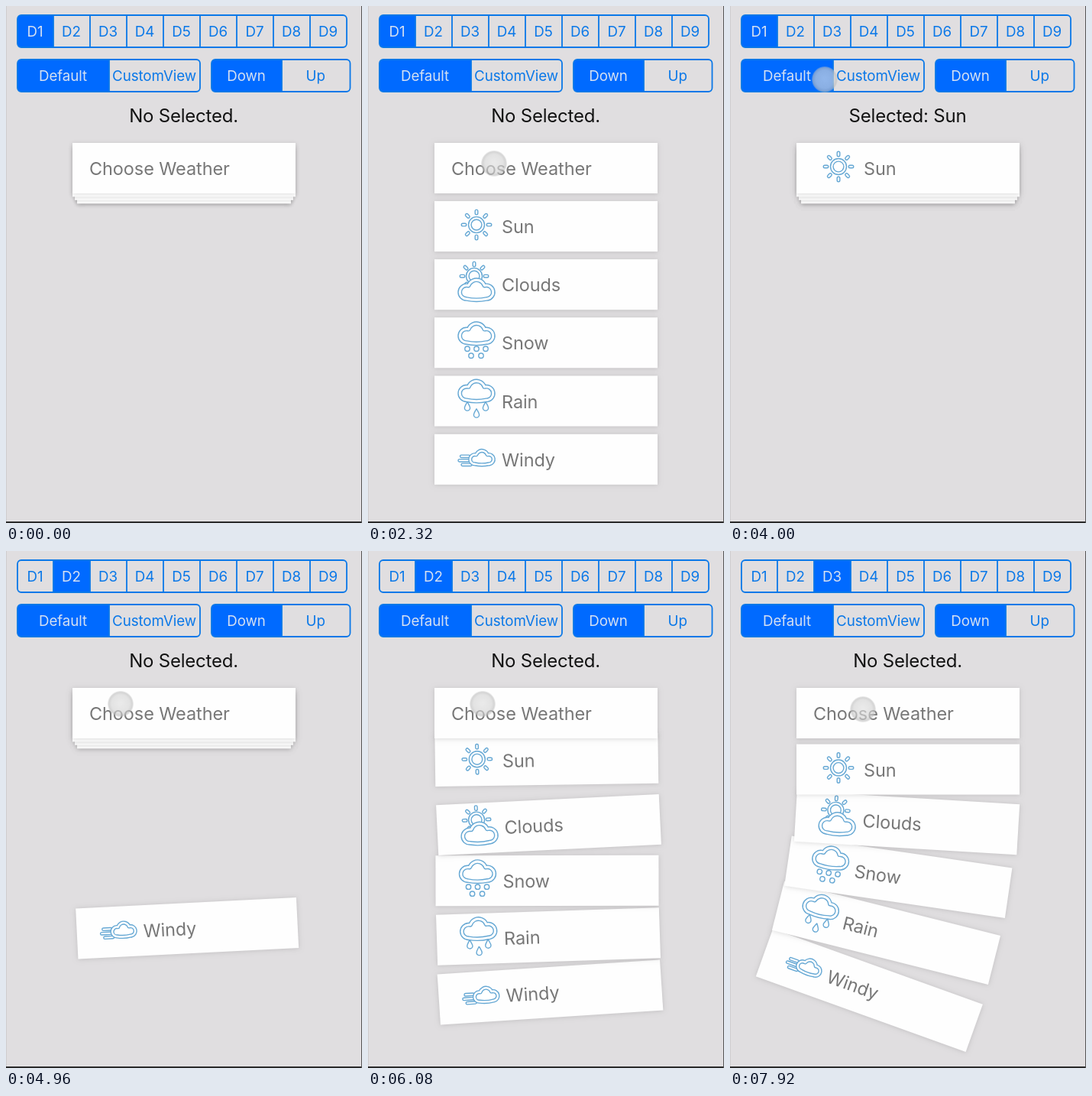
An HTML page with a canvas that plays this animation: 466x676 px, repeating every 8 s.

```html
<!DOCTYPE html>
<html lang="en">
<head>
<meta charset="utf-8">
<title>Drop-down menu</title>
<style>
html, body { margin: 0; width: 466px; height: 676px; overflow: hidden; background: #e0dee0; }
canvas { display: block; }
</style>
</head>
<body>
<canvas id="stage" width="466" height="676"></canvas>
<script>
const c = document.getElementById('stage').getContext('2d');
const LOOP = 8000, STEP = 80, TAU = Math.PI * 2;
const BG = '#e0dee0', BLUE = '#006aff', LINE = '#0a78e8', ICON = '#66a8d4';
const FONT = 'Inter, Roboto, sans-serif';
const CARD = { x: 233, y: 212, w: 292, h: 66, pitch: 73 };
const NAMES = ['Sun', 'Clouds', 'Snow', 'Rain', 'Windy'];

// One entry per demo tab: when it starts, opens, closes; row tilt in degrees and sideways shift.
const MODES = [
  { from: 0, open: 2040, close: 3120, picks: 0, delay: 0, tilt: [0, 0, 0, 0, 0], shift: [0, 0, 0, 0, 0] },
  { from: 4280, open: 4865, close: 6000, delay: 100, tilt: [-1, -2.8, -0.1, -1.9, -3.75], shift: [1, 3.5, 1.5, 3, 5.5] },
  { from: 6840, open: 7450, close: Infinity, delay: 40, tilt: [0, 3.5, 8.5, 14.4, 19.9], shift: [0, -1.5, -13, -29, -51] }
];
// Touch position: time, x, y
const TOUCH = [
  [1360, 300, -30], [1680, 165, 206], [2480, 165, 206], [2760, 165, 262], [3520, 165, 262],
  [3720, 162, 247], [4000, 124, 96], [4160, 93, 39], [4480, 93, 39], [4760, 150, 200],
  [6320, 150, 200], [6680, 134, 38], [7120, 134, 38], [7400, 174, 207]
];

const clamp = v => Math.max(0, Math.min(1, v));
const mix = (a, b, k) => a + (b - a) * k;
const smooth = v => { v = clamp(v); return v * v * (3 - 2 * v); };

function spring(ms) {
  if (ms <= 0) return 0;
  const s = ms / 1000;
  return 1 - Math.exp(-9.8 * s) * (Math.cos(16.45 * s) + 0.596 * Math.sin(16.45 * s));
}

function text(str, x, y, size, color, align = 'left', spacing = -0.1) {
  c.font = `${size}px ${FONT}`;
  c.letterSpacing = spacing + 'px';
  c.textAlign = align;
  c.textBaseline = 'alphabetic';
  c.fillStyle = color;
  c.fillText(str, x, y + size * 0.364);
}

function segments(x, y, edges, labels, alphas) {
  const w = edges[edges.length - 1], h = 42;
  c.save();
  c.beginPath();
  c.roundRect(x, y, w, h, 5);
  c.clip();
  labels.forEach((label, i) => {
    const left = x + edges[i], width = edges[i + 1] - edges[i], mid = left + width / 2 - 0.5;
    text(label, mid, y + 21.5, 18.8, LINE, 'center');
    if (!alphas[i]) return;
    c.globalAlpha = alphas[i];
    c.fillStyle = BLUE;
    c.fillRect(left, y, width, h);
    text(label, mid, y + 21.5, 18.8, '#d5e0f2', 'center');
    c.globalAlpha = 1;
  });
  c.restore();
  c.strokeStyle = LINE;
  c.lineWidth = 1.8;
  c.beginPath();
  c.roundRect(x, y, w, h, 5);
  edges.slice(1, -1).forEach(e => { c.moveTo(x + e, y); c.lineTo(x + e, y + h); });
  c.stroke();
}

function ring(x, y, r) {
  c.beginPath();
  c.arc(x, y, r, 0, TAU);
  c.stroke();
}

function capsule(x, y, w, h, angle = 0) {
  c.save();
  c.translate(x, y);
  c.rotate(angle);
  c.beginPath();
  c.roundRect(-w / 2, -h / 2, w, h, Math.min(w, h) / 2);
  c.stroke();
  c.restore();
}

function sun(x, y, r, reach) {
  ring(x, y, r);
  ring(x, y, r - 3.6);
  for (let i = 0; i < 8; i++) {
    const a = i * TAU / 8;
    capsule(x + Math.cos(a) * reach, y + Math.sin(a) * reach, 6.5, 3.6, a);
  }
}

// A wide line with a white core leaves a double outline
function cloud(x, y, k = 1) {
  const arc = (cx, cy, r, from, to) =>
    c.arc(x + cx * k, y + cy * k, r * k, from * TAU / 360, to * TAU / 360);
  c.beginPath();
  arc(-13, 2, 8.8, 90, 280);
  arc(0, -3, 11, 199, 341);
  arc(13, 2, 8.8, 260, 450);
  c.quadraticCurveTo(x, y + 13.5 * k, x - 13 * k, y + 10.8 * k);
  c.closePath();
  c.save();
  c.lineJoin = 'round';
  c.fillStyle = '#fff';
  c.fill();
  const gap = 3 * Math.sqrt(k);
  c.lineWidth = gap + 2.8;
  c.stroke();
  c.strokeStyle = '#fff';
  c.lineWidth = gap;
  c.stroke();
  c.restore();
}

function drop(x, y) {
  c.beginPath();
  c.moveTo(x, y - 6);
  c.bezierCurveTo(x + 2, y - 2, x + 3.6, y, x + 3.6, y + 2);
  c.arc(x, y + 2, 3.6, 0, Math.PI);
  c.bezierCurveTo(x - 3.6, y, x - 2, y - 2, x, y - 6);
  c.stroke();
}

const ICONS = [
  () => sun(0, -2, 10.5, 16.5),
  () => { sun(-3, -11, 10.5, 15.5); cloud(0, 8); },
  () => {
    cloud(0, -11);
    [[-12, 8], [0, 8], [12, 8], [-7, 17], [6, 17]].forEach(([x, y]) => ring(x, y, 3.2));
  },
  () => { cloud(0, -12); drop(-12, 7); drop(12, 7); drop(0, 16); },
  () => {
    capsule(-15, -4, 13, 3.4);
    capsule(-16, 1.5, 16, 3.4);
    capsule(-13, 7, 14, 3.4);
    cloud(7, -1.5, 0.7);
  }
];

function card(x, y, item, angle = 0, scale = 1) {
  c.save();
  c.translate(x, y);
  c.rotate(angle * Math.PI / 180);
  c.scale(scale, 1);
  c.shadowColor = 'rgba(0,0,0,.14)';
  c.shadowBlur = 6;
  c.shadowOffsetY = 0.5;
  c.fillStyle = '#fefefe';
  c.fillRect(-CARD.w / 2, -CARD.h / 2, CARD.w, CARD.h);
  c.shadowColor = 'transparent';
  if (item < 0) {
    text('Choose Weather', -124, 0, 23.5, '#777');
  } else {
    text(NAMES[item], -58, 0.5, 23.5, '#777');
    c.translate(-91, 0);
    c.strokeStyle = ICON;
    c.lineWidth = 1.4;
    ICONS[item]();
  }
  c.restore();
}

function menu(mode, t, picked) {
  for (let i = 4; i >= 0; i--) {
    const k = t < mode.close
      ? spring(t - mode.open - (4 - i) * mode.delay)
      : 1 - smooth((t - mode.close - i * mode.delay) / 300);
    const depth = Math.min(i, 2);
    card(
      CARD.x + mode.shift[i] * k,
      mix(CARD.y + 4.4 * (depth + 1), CARD.y + CARD.pitch * (i + 1), k),
      i, mode.tilt[i] * k, mix(1 - depth * 0.021, 1, clamp(k))
    );
  }
  card(CARD.x, CARD.y, picked);
}

function touch(t) {
  const n = TOUCH.findIndex(p => p[0] > t);
  if (n === 0) return;
  const b = TOUCH[n < 0 ? TOUCH.length - 1 : n], a = n < 0 ? b : TOUCH[n - 1];
  const k = a === b ? 0 : (t - a[0]) / (b[0] - a[0]);
  const x = mix(a[1], b[1], k), y = mix(a[2], b[2], k);
  const glow = c.createRadialGradient(x, y - 1, 2, x, y, 17);
  glow.addColorStop(0, 'rgba(222,222,222,.65)');
  glow.addColorStop(0.65, 'rgba(212,212,212,.65)');
  glow.addColorStop(0.88, 'rgba(190,190,190,.65)');
  glow.addColorStop(1, 'rgba(195,195,195,.25)');
  c.fillStyle = glow;
  c.beginPath();
  c.arc(x, y, 17, 0, TAU);
  c.fill();
}

function draw(t) {
  c.fillStyle = BG;
  c.fillRect(0, 0, 466, 676);

  const n = MODES.findLastIndex(m => t >= m.from), mode = MODES[n];
  const fade = n ? clamp((t - mode.from) / 240) : 1;
  const tabs = Array.from({ length: 9 }, (_, i) => i === n ? fade : i === n - 1 ? 1 - fade : 0);
  const tabEdges = [0, 47, 95, 143, 191, 239, 287, 335, 383, 431];
  segments(15, 12, tabEdges, tabs.map((_, i) => 'D' + (i + 1)), tabs);
  segments(15, 70, [0, 120, 239], ['Default', 'CustomView'], [1, 0]);
  segments(269, 70, [0, 92, 181.5], ['Down', 'Up'], [1, 0]);

  const picked = mode.picks !== undefined && t >= mode.close ? mode.picks : -1;
  const label = picked < 0 ? 'No Selected.' : 'Selected: ' + NAMES[picked];
  text(label, 232.5, 143, 24, '#111', 'center', -0.22);
  menu(mode, t, picked);
  touch(t);

  c.fillStyle = '#2a2a2a';
  c.fillRect(0, 674, 466, 2);
  c.fillStyle = '#555';
  c.fillRect(465, 0, 1, 676);
  c.fillStyle = '#cfcdcf';
  c.fillRect(0, 0, 1, 674);
}

const start = performance.now();
function frame() {
  const t = (performance.now() - start) % LOOP;
  draw(t - t % STEP);
  requestAnimationFrame(frame);
}
frame();
</script>
</body>
</html>
```
